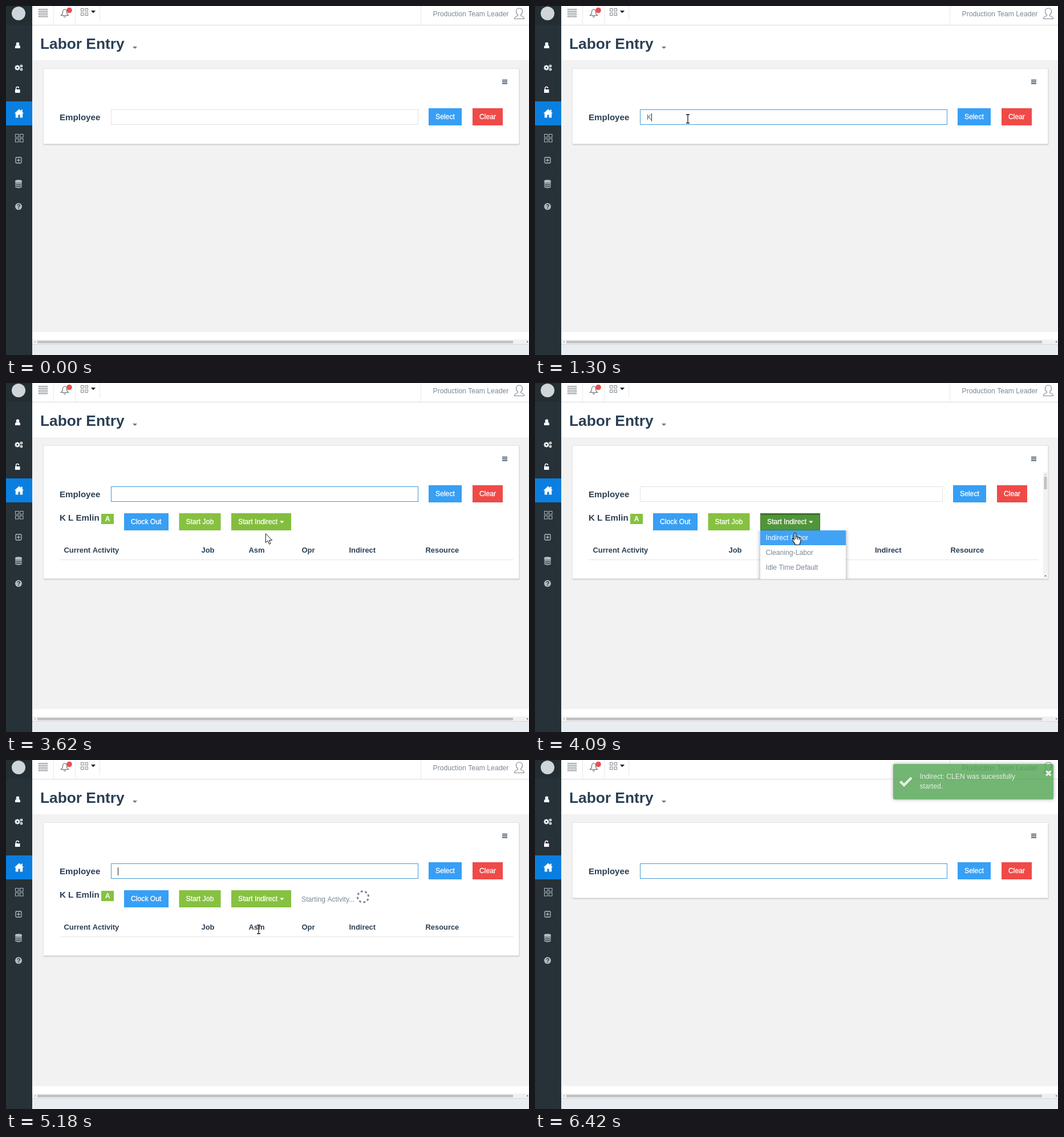
Animation, 917 px wide and 611 px high, one loop 6890 ms. Source, as an HTML page with a canvas:

```html
<!DOCTYPE html>
<html lang="en">
<head>
<meta charset="utf-8">
<title>Labor Entry</title>
<style>
html, body { margin: 0; width: 100%; height: 100%; overflow: hidden; background: #fff; }
canvas { display: block; width: 917px; height: 611px; }
</style>
</head>
<body>
<canvas id="stage" width="917" height="611"></canvas>
<script>
const ctx = document.getElementById('stage').getContext('2d');
const LOOP = 6890;
const FONT = '"Liberation Sans", Arial, sans-serif';
const NAVY = '#2a3f54', GREY = '#7b8896', BLUE = '#379ff5', RED = '#ef4a48', GREEN = '#86c140';
const TAU = Math.PI * 2;

// ---------- helpers ----------
function rect(x, y, w, h, color) {
  ctx.fillStyle = color;
  ctx.fillRect(x, y, w, h);
}
function frame(x, y, w, h, color, lw = 1) {
  ctx.strokeStyle = color;
  ctx.lineWidth = lw;
  ctx.strokeRect(x, y, w, h);
}
function text(s, x, y, color, size = 12.2, weight = 400) {
  ctx.font = `${weight} ${size}px ${FONT}`;
  ctx.fillStyle = color;
  ctx.fillText(s, x, y);
}
function dot(x, y, r, color) {
  ctx.fillStyle = color;
  ctx.beginPath();
  ctx.arc(x, y, r, 0, TAU);
  ctx.fill();
}
function poly(points, fill, stroke, lw = 1) {
  ctx.beginPath();
  points.forEach(([x, y]) => ctx.lineTo(x, y));
  ctx.closePath();
  if (fill) { ctx.fillStyle = fill; ctx.fill(); }
  if (stroke) { ctx.strokeStyle = stroke; ctx.lineWidth = lw; ctx.stroke(); }
}
function path(d, fill, stroke, lw = 1) {
  const p = new Path2D(d);
  if (fill) { ctx.fillStyle = fill; ctx.fill(p); }
  if (stroke) { ctx.strokeStyle = stroke; ctx.lineWidth = lw; ctx.stroke(p); }
}
const caretDown = (x, y, w, h, color) => poly([[x, y], [x + w, y], [x + w / 2, y + h]], color);
function at(x, y, draw) {
  ctx.save();
  ctx.translate(x, y);
  draw();
  ctx.restore();
}
const lerp = (a, b, p) => a + (b - a) * p;
const mix = (a, b, p) => `rgb(${a.map((v, i) => Math.round(lerp(v, b[i], p)))})`;
const ease = p => p * p * (3 - 2 * p);

// Held steps: 0 before `from`, then n equal rises, reaching 1 at `to`.
function steps(t, from, to, n) {
  if (t < from) return 0;
  const i = Math.floor((t - from) / (to - from) * (n - 1) + 0.08);
  return (Math.min(i, n - 1) + 1) / n;
}
// Position on a polyline of [progress, x, y] keys.
function along(keys, p) {
  let i = 1;
  while (i < keys.length - 1 && p > keys[i][0]) i++;
  const a = keys[i - 1], b = keys[i];
  const q = (p - a[0]) / (b[0] - a[0]);
  return [lerp(a[1], b[1], q), lerp(a[2], b[2], q)];
}

// ---------- static chrome ----------
function gear(x, y, r) {
  dot(x, y, r, '#fff');
  for (let i = 0; i < 8; i++) {
    const a = i * TAU / 8;
    dot(x + Math.cos(a) * r, y + Math.sin(a) * r, r * 0.27, '#fff');
  }
  dot(x, y, r * 0.4, '#263238');
}
function grid(x, y, cell, pitch, color) {
  for (let i = 0; i < 4; i++) frame(x + (i % 2) * pitch, y + (i >> 1) * pitch, cell, cell, color);
}
function sidebar() {
  const pale = '#b4bcc1';
  rect(0, 0, 46, 611, '#263238');
  rect(0, 0, 46, 33, '#232e33');
  dot(22, 13, 12, '#cfd5d8');
  rect(0, 167, 46, 42, '#0b7fe0');

  dot(20.5, 66.3, 2.8, '#fff');
  path('M16 74v-2q0-3 2.6-3.4q2 1.2 3.8 0q2.6.4 2.6 3.4v2z', '#fff');
  gear(20, 108, 3.8);
  gear(27, 105, 2);
  gear(27, 111, 2);
  rect(16, 146, 8.5, 6, '#fff');
  path('M17.6 146v-2a2.4 2.4 0 0 1 4.8 0', null, '#fff', 1.5);
  path('M23 180.5l8.2 7.5h-2v7.5h-4.6v-5h-3.2v5h-4.6v-7.5h-2zM26.5 181.5h2.3v4h-2.3z', '#fff');

  grid(16.5, 224.5, 5.5, 8, pale);
  ctx.beginPath();
  ctx.roundRect(17, 265, 10, 10, 1.5);
  ctx.strokeStyle = pale;
  ctx.lineWidth = 1.3;
  ctx.stroke();
  rect(19, 269.4, 6, 1.3, pale);
  rect(21.4, 267, 1.3, 6, pale);
  path('M16 306.5a6 2.3 0 0 1 12 0v1a6 2.3 0 0 1-12 0z', pale);
  for (let i = 0; i < 3; i++) {
    const y = 309 + i * 3.1;
    path(`M16 ${y}q6 3.6 12 0v1.7q-6 3.6-12 0z`, pale);
  }
  dot(22, 351, 6, pale);
  text('?', 19, 355, '#263238', 10.5, 700);
}
function topbar() {
  rect(46, 33, 871, 1, '#d9dcdf');
  for (const [x, h] of [[83, 33], [121, 33], [164, 26], [727, 33]]) rect(x, 0, 1, h, '#e6e8ea');
  for (let i = 0; i < 4; i++) frame(57.5, 5.5 + i * 4, 15, 1.6, '#8a9299', 0.9);
  path('M96.5 16.5q3-2 3-6q0-4.5 3.5-4.8q3.5.3 3.5 4.8q0 4 3 6zM101 17.5q2 4 4 0', null, '#66727e', 1.1);
  dot(111, 7.5, 4.8, '#ea4f4d');
  grid(131.5, 4.5, 4.5, 7.5, '#7f878e');
  caretDown(149, 8, 8, 4.5, '#222');
  text('Production Team Leader', 748.5, 18, GREY);
  path('M891.5 22.5q.3-4 5-5q1.5-.4 1-1.8q-3.200-3-3-6.700q.3-5 5.500-5t5.500 5q.2 3.700-3 6.700q-.5 1.400 1 1.800q4.700 1 5 5z', null, '#7f8a95', 1.1);
}
function page() {
  rect(0, 0, 917, 611, '#fff');
  rect(46, 95, 871, 476, '#f2f2f2');
  rect(46, 584, 871, 8, '#f1f1f1');
  rect(55, 586, 834, 4.5, '#c1c1c1');
  rect(46, 592, 871, 1, '#d5d9dd');
  rect(46, 593, 871, 18, '#e9edf1');
  poly([[51.5, 586.5], [51.5, 589.5], [49.5, 588]], '#999');
  poly([[913.5, 586.5], [913.5, 589.5], [915.5, 588]], '#333');
  sidebar();
  topbar();
  text('Labor Entry', 60, 75, NAVY, 26.3, 700);
  caretDown(222, 71, 8, 4, '#6b7783');
}

// ---------- card ----------
function button(label, x, y, w, color) {
  rect(x, y, w, 30, color);
  text(label, x + 12, y + 19, '#fff', 12.2);
  ctx.strokeStyle = '#fff';
  ctx.lineWidth = 0.3;
  ctx.strokeText(label, x + 12, y + 19);
}
function card(bottom) {
  ctx.save();
  ctx.shadowColor = 'rgba(0,0,0,.22)';
  ctx.shadowBlur = 2;
  ctx.shadowOffsetY = 1;
  rect(66, 110, 834, bottom - 110, '#fff');
  ctx.restore();
  frame(65.5, 109.5, 834, bottom - 109.500, '#e4e4e4');
  rect(66, bottom - 0.5, 834, 1, '#d2d2d2');
  for (let i = 0; i < 3; i++) rect(870, 129 + i * 3, 9, 1.5, NAVY);
}
function entryRow(s) {
  const dx = s.menu ? -8 : 0;
  text('Employee', 94, 200, NAVY, 15.1, 700);
  frame(184.5, 181.5, 538 + dx, 26, mix([224, 226, 228], [66, 155, 216], s.focus));
  text(s.typed, 196, 199, '#5c6670', 12);
  if (s.caret) {
    const w = ctx.measureText(s.typed).width;
    rect(196 + Math.floor(w + 0.3), 188, 1, 14, '#222');
  }
  button('Select', 741 + dx, 179, 58, BLUE);
  button('Clear', 818 + dx, 179, 53, RED);
}
function menu(hover) {
  ctx.save();
  ctx.beginPath();
  ctx.rect(380, 258, 180, 85);
  ctx.clip();
  ctx.shadowColor = 'rgba(0,0,0,.4)';
  ctx.shadowBlur = 7;
  ctx.shadowOffsetY = 2;
  rect(395, 254, 150, 110, '#fff');
  ctx.restore();
  ['Indirect Labor', 'Cleaning-Labor', 'Idle Time Default'].forEach((label, i) => {
    const on = i === hover;
    if (on) rect(395, 258 + i * 26, 150, 26, '#42a3f5');
    text(label, 404.5, 275 + i * 26, on ? '#fff' : GREY);
  });
}
function spinner(angle) {
  for (let i = 0; i < 8; i++) {
    const a = angle + i * TAU / 8;
    at(626 + Math.cos(a) * 9.6, 239.5 + Math.sin(a) * 9.6, () => {
      ctx.rotate(a);
      ctx.beginPath();
      ctx.ellipse(0, 0, 1.6, 2.2, 0, 0, TAU);
      ctx.fillStyle = '#77849a';
      ctx.fill();
    });
  }
}
function vScroll() {
  rect(891, 156, 8, 187, '#f3f3f3');
  rect(892.5, 164, 5, 22, '#c1c1c1');
  poly([[893.5, 161.5], [896.5, 161.5], [895, 159.5]], '#999');
  poly([[893.5, 337], [896.5, 337], [895, 339]], '#333');
}
function activity(s) {
  text('K L Emlin', 94, 241, NAVY, 15.1, 700);
  rect(167, 229, 22, 18, GREEN);
  text('A', 173.700, 242, '#fff', 12, 700);
  button('Clock Out', 207, 228, 78, BLUE);
  button('Start Job', 303.5, 228, 73, GREEN);
  const green = mix([134, 193, 64], [122, 178, 56], s.hover);
  button('Start Indirect', 395, 228, 105, s.menu ? '#50953a' : green);
  if (s.menu) {
    rect(395, 228, 105, 3, '#3a7325');
    frame(395.5, 228.5, 104, 29, '#3f7a2a');
  }
  caretDown(480, 241.5, 7.5, 4, '#fff');

  const shift = s.menu ? 1 : 0;
  const heads = [['Current Activity', 102, 0], ['Job', 343, 3], ['Asm', 426, 4], ['Opr', 519, 5], ['Indirect', 602, 5.5], ['Resource', 736, 7]];
  for (const [label, x, d] of heads) text(label, x - 0.5 - d * shift, 297, NAVY, 12.9, 700);
  rect(94, 309, 796 - 8 * shift, 1, '#e6e6e6');

  if (s.spin !== null) {
    text('Starting Activity...', 518, 248, GREY);
    spinner(s.spin);
  }
  if (s.menu) {
    vScroll();
    menu(s.item);
  }
}

function toast(alpha) {
  ctx.save();
  ctx.globalAlpha = alpha;
  ctx.save();
  const box = new Path2D();
  box.roundRect(628, 7, 281, 62, 3);
  const outside = new Path2D(box);
  outside.rect(600, 0, 317, 100);
  ctx.clip(outside, 'evenodd');
  ctx.shadowColor = '#999';
  ctx.shadowBlur = 6;
  ctx.fillStyle = '#51a351';
  ctx.fill(box);
  ctx.restore();
  ctx.fillStyle = '#51a351';
  ctx.fill(box);
  text('Indirect: CLEN was sucessfully', 674.5, 33, '#fff');
  text('started.', 674.5, 50, '#fff');
  ctx.lineWidth = 4.5;
  ctx.strokeStyle = '#fff';
  ctx.stroke(new Path2D('M640.5 37.500l6.500 6.500l13-13'));
  ctx.lineWidth = 3.4;
  ctx.stroke(new Path2D('M896.3 19.300l8 8m0-8l-8 8'));
  ctx.restore();
}

// ---------- pointer ----------
const pointers = {
  arrow() {
    poly([[0, 0], [0, 16], [3.7, 12.5], [6.3, 18.5], [8.8, 17.4], [6.2, 11.6], [11.4, 11.6]], '#fff', '#111');
  },
  beam() {
    path('M-3 -7h2.200l.8 .8l.8-.8h2.200M0 -6.500v13.500M-3 8h2.200l.8-.8l.8 .8h2.200', null, '#1a1a1a', 1.3);
  },
  hand() {
    path('M-1.500 13V1.500q0-1.700 1.500-1.700t1.500 1.700v5.500q3-1 3.200 .8q2.600-.6 2.900 .9q2.400-.4 2.400 1.800v4q0 2-1.500 4v2.300H0v-2q-3.200-3.500-5-7q-.6-1.800 1.200-1.800q1 .1 2.300 2zM1.500 7v4M4.700 8v3.500M7.600 9v3', '#fff', '#111', 1.1);
  }
};
function pointer(t) {
  if (t < 70 || t >= 6420) return null;
  if (t < 3240) {
    const p = (steps(t, 70, 520, 7) * 7 - 1) / 6;
    const [x, y] = along([[0, 607, 457], [1, 268, 197]], ease(p));
    return [y < 209 ? 'beam' : 'arrow', x, y];
  }
  if (t < 3940) {
    const p = steps(t, 3240, 3860, 9);
    const [x, y] = along([[0, 268, 197], [0.22, 325, 217], [0.42, 425, 254], [0.55, 455, 264], [0.67, 459, 257], [1, 462, 246]], p);
    return [x > 395 && y < 258 ? 'hand' : y < 209 ? 'beam' : 'arrow', x, y];
  }
  if (t < 5880) {
    const p = steps(t, 3940, 4400, 7);
    const [x, y] = along([[0, 462, 246], [0.15, 462, 246], [1, 443, 296]], p);
    return [t < 4570 ? 'hand' : t < 5260 ? 'beam' : 'arrow', x, y];
  }
  const p = steps(t, 5880, 6420, 8);
  const [x, y] = along([[0, 443, 296], [0.875, 882, 585], [1, 917, 611]], p);
  return ['arrow', x, y];
}

// ---------- timeline ----------
const KEYS = [1300, 1620, 1850, 1920, 2150, 2310, 2380];

function stateAt(t) {
  const open = t >= 2780 && t < 5260;
  const menuOpen = t >= 3940 && t < 4640;
  const mouse = pointer(t);
  return {
    open, mouse,
    menu: menuOpen,
    item: mouse && mouse[2] >= 258 ? Math.floor((mouse[2] - 258) / 26) : -1,
    typed: t < 2780 ? 'KLEMLIN'.slice(0, KEYS.filter(k => t >= k).length) : '',
    focus: t < 3940 ? steps(t, 670, 900, 4) : steps(t, 4640, 4870, 4),
    caret: (t >= 520 && t < 3320) || (t >= 4720 && t < 5330),
    hover: t < 3940 ? steps(t, 3620, 3860, 4) : 0,
    spin: t >= 4640 && open ? steps(t, 4570, 5180, 9) * 9 * 0.236 : null,
    toast: 0.8 * steps(t, 5260, 5560, 5)
  };
}
function render(t) {
  const s = stateAt(t);
  page();
  card(s.open ? 343 : 242);
  entryRow(s);
  if (s.open) activity(s);
  if (s.toast) toast(s.toast);
  if (s.mouse) at(s.mouse[1], s.mouse[2], pointers[s.mouse[0]]);
}

const start = performance.now();
function tick() {
  render((performance.now() - start) % LOOP);
  requestAnimationFrame(tick);
}
tick();
</script>
</body>
</html>
```
